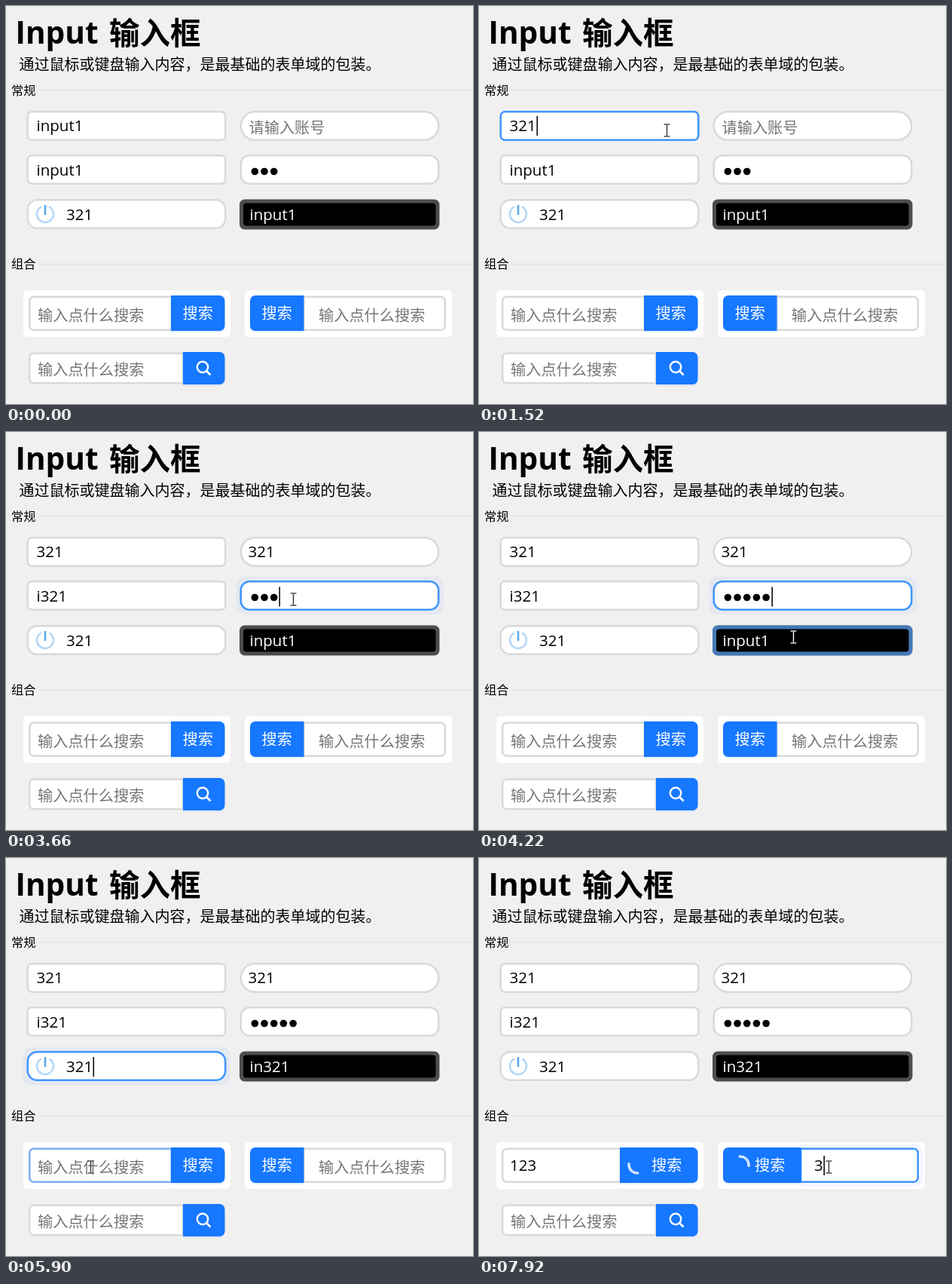
Recreate the animation shown at these times as an HTML page with a canvas. Size 620 by 528 pixels, loop 7990 ms.

```html
<!DOCTYPE html>
<html lang="zh-CN">
<head>
<meta charset="utf-8">
<title>Input 输入框</title>
<style>
html, body { margin: 0; width: 100%; height: 100%; overflow: hidden; background: #f0f0f0; }
canvas { display: block; }
</style>
</head>
<body>
<canvas id="stage" width="620" height="528"></canvas>
<script>
const ctx = document.getElementById('stage').getContext('2d');
const LOOP = 7990, STEP = 76.83;
const FAMILY = '"Open Sans", "Noto Sans CJK SC", "Noto Sans CJK", sans-serif';
const BLUE = '#1677ff', FOCUS = '#4096ff', GREY = '#d9d9d9';
const DOT = 12.7;
const LEFT_LOAD = 7010, RIGHT_LOAD = 7510;

const clamp = v => Math.max(0, Math.min(1, v));
const ease = v => { v = clamp(v); return v * v * (3 - 2 * v); };
const within = (t, span) => !!span && t >= span[0] && t < span[1];
const growth = (t, start) => 32 * ease((t - start) / 220);

// Pointer path: time, x, y
const path = [
  [0, -30, 440], [70, -6, 414], [300, 60, 300], [590, 158, 161], [780, 158, 161],
  [1060, 12, 162], [1300, 14, 164], [1660, 372, 165], [2440, 373, 165],
  [2700, 150, 219], [2760, 150, 219], [2990, 49, 220], [3180, 52, 222],
  [3450, 381, 222], [3960, 381, 222], [4250, 420, 277], [4380, 420, 277],
  [4660, 341, 278], [4800, 341, 279], [4960, 320, 281], [5000, 320, 281],
  [5080, 270, 288], [5320, 196, 277], [5540, 196, 277], [5900, 112, 410],
  [6660, 112, 410], [6930, 262, 411], [7080, 262, 411], [7400, 360, 410],
  [7530, 360, 410], [7700, 464, 410], [7990, 464, 410]
];
const presses = [
  [620, 1090], [1760, 1900], [2710, 3010], [3460, 3580], [4330, 4690],
  [5430, 5540], [6040, 6160], [6990, 7090], [7490, 7590], [7690, 7790]
];

const fields = [
  { x: 27.5, y: 139, w: 265, h: 40, r: 7, tx: 40.5, by: 166, start: 'input1', keep: '', add: '321',
    keys: [1200, 1290, 1380], focus: [610, 1760], drag: [780, 1200], flat: true },
  { x: 310.5, y: 139, w: 265, h: 40, r: 20, tx: 321.5, by: 166, start: '', keep: '', add: '321',
    keys: [2280, 2440, 2520], focus: [1760, 2710], hint: '请输入账号', hx: 322.5, hy: 168.5 },
  { x: 27.5, y: 197, w: 265, h: 40, r: 7, tx: 40.5, by: 225, start: 'input1', keep: 'i', add: '321',
    keys: [3060, 3150, 3240], focus: [2710, 3460], drag: [2760, 3060] },
  { x: 310.5, y: 197, w: 265, h: 40, r: 13, tx: 324, by: 219.5, secret: true, start: '***', keep: '***', add: '**',
    keys: [3830, 3960], focus: [3460, 4330] },
  { x: 27.5, y: 256, w: 265, h: 40, r: 14, tx: 80, by: 284, start: '321', focus: [5430, 6040] },
  { x: 310, y: 256.5, w: 265.5, h: 40, r: 7, tx: 323.5, by: 284, dark: true, start: 'input1', keep: 'in', add: '321',
    keys: [4780, 4880, 5070], focus: [4330, 5430], drag: [4380, 4780] },
  { x: 30, y: 384.5, w: 191, h: 46.5, r: [7, 0, 0, 7], tx: 41, by: 415, start: '', keep: '', add: '123',
    keys: [6270, 6420, 6570], focus: [6040, 6990], hint: '输入点什么搜索', hx: 42, hy: 417.5,
    fit: t => ({ w: 191 - growth(t, LEFT_LOAD) }) },
  { x: 394, y: 384.5, w: 190, h: 46.5, r: [0, 7, 7, 0], tx: 413, by: 415, start: '', keep: '', add: '3',
    keys: [7830], focus: [7690, 8000], hint: '输入点什么搜索', hx: 415, hy: 417.5,
    fit: t => { const g = growth(t, RIGHT_LOAD); return { x: 394 + g, w: 190 - g, tx: 413 + g, hx: 415 + g }; } },
  { x: 30, y: 459.5, w: 206, h: 42, r: [7, 0, 0, 7], tx: 41, by: 489, start: '', hint: '输入点什么搜索', hx: 42, hy: 490 }
];

function pointer(t) {
  let i = 1;
  while (i < path.length - 1 && path[i][0] < t) i++;
  const [t0, x0, y0] = path[i - 1], [t1, x1, y1] = path[i];
  const k = clamp((t - t0) / (t1 - t0));
  return { x: x0 + (x1 - x0) * k, y: y0 + (y1 - y0) * k };
}

const inside = (p, b) => p.x > b.x && p.x < b.x + b.w && p.y > b.y && p.y < b.y + b.h;

// Share of the last 200 ms that the pointer spent over the box
function hover(t, box) {
  let n = 0;
  for (let k = 0; k < 5; k++) n += inside(pointer(Math.max(0, t - 40 * k)), box);
  return n / 5;
}

function setFont(size, weight = 400) { ctx.font = `${weight} ${size}px ${FAMILY}`; }

function label(str, x, y, size = 20.2, color = '#000', weight = 400) {
  setFont(size, weight);
  ctx.fillStyle = color;
  ctx.fillText(str, x, y);
}

function box(x, y, w, h, r, color) {
  ctx.fillStyle = color;
  ctx.beginPath();
  ctx.roundRect(x, y, w, h, r);
  ctx.fill();
}

function line(points, color, width) {
  ctx.strokeStyle = color;
  ctx.lineWidth = width;
  ctx.beginPath();
  points.forEach(([x, y], i) => i ? ctx.lineTo(x, y) : ctx.moveTo(x, y));
  ctx.stroke();
}

function arc(x, y, r, from, to, color, width) {
  ctx.strokeStyle = color;
  ctx.lineWidth = width;
  ctx.beginPath();
  ctx.arc(x, y, r, from, to);
  ctx.stroke();
}

function disc(x, y, r, color) {
  ctx.fillStyle = color;
  ctx.beginPath();
  ctx.arc(x, y, r, 0, Math.PI * 2);
  ctx.fill();
}

function textWidth(f, str) {
  if (f.secret) return str.length * DOT;
  setFont(20.5);
  return ctx.measureText(str).width;
}

function valueText(f, str, color) {
  if (!f.secret) return label(str, f.tx, f.by, 20.5, color);
  for (let i = 0; i < str.length; i++) disc(f.tx + DOT * (i + 0.5), f.by, 4.8, color);
}

function drawSelection(f, t, str) {
  const end = f.tx + textWidth(f, str);
  const from = Math.max(f.tx + textWidth(f, f.keep), Math.min(end, pointer(t).x));
  if (from >= end) return;
  ctx.save();
  ctx.beginPath();
  ctx.rect(from, f.by - 22, end - from, 28);
  ctx.clip();
  ctx.fillStyle = BLUE;
  ctx.fillRect(from, f.by - 22, end - from, 28);
  valueText(f, str, '#fff');
  ctx.restore();
}

function drawField(base, t) {
  const f = base.fit ? { ...base, ...base.fit(t) } : base;
  const focused = within(t, f.focus);
  const keys = f.keys || [];
  const typed = keys.filter(k => k <= t);
  const str = typed.length ? f.keep + f.add.slice(0, typed.length) : f.start;
  const ink = f.dark ? '#fff' : '#000';
  const edge = f.dark ? 5 : 2.5;

  if (focused && !f.flat) {
    box(f.x - 5, f.y - 5, f.w + 10, f.h + 10, 10, `rgba(5,100,255,${f.dark ? 0.07 : 0.05})`);
  }
  box(f.x, f.y, f.w, f.h, f.r, f.dark ? '#4d4d4d' : GREY);
  ctx.globalAlpha = focused ? 1 : hover(t, f);
  box(f.x, f.y, f.w, f.h, f.r, FOCUS);
  ctx.globalAlpha = 1;
  const inner = [].concat(f.r).map(r => Math.max(0, r - edge + (f.dark ? 2 : 0)));
  box(f.x + edge, f.y + edge, f.w - 2 * edge, f.h - 2 * edge, inner, f.dark ? '#000' : '#fff');

  if (!str && f.hint) label(f.hint, f.hx, f.hy, 20.2, '#757575');
  valueText(f, str, ink);
  if (!focused) return;

  if (within(t, f.drag)) return drawSelection(f, t, str);
  const since = t - Math.max(f.focus[0], ...typed);
  if (since % 1060 < 530) {
    const top = f.secret ? f.by - 14 : f.by - 20;
    ctx.fillStyle = ink;
    ctx.fillRect(Math.round(f.tx + textWidth(f, str)) + 0.5, top, 1.5, 26);
  }
}

function button(x, y, w, h, r, t) {
  box(x, y + 2, w, h, r, 'rgba(5,110,255,0.1)');
  box(x, y, w, h, r, BLUE);
  ctx.globalAlpha = hover(t, { x, y, w, h });
  box(x, y, w, h, r, FOCUS);
  ctx.globalAlpha = 1;
}

function searchButton(x, r, loadAt, t, growLeft) {
  const g = growth(t, loadAt);
  const left = growLeft ? x - g : x;
  button(left, 384, 71.5 + g, 47, r, t);
  label('搜索', left + 15.5 + g * 0.83, 415, 20.2, '#fff');
  if (!g) return;
  const turn = ((t - loadAt) * 0.36 + 121) * Math.PI / 180;
  ctx.globalAlpha = g / 32;
  ctx.lineCap = 'round';
  arc(left + 23, 407, 11, turn, turn + 1.75, '#d3e4ff', 3.5);
  ctx.lineCap = 'butt';
  ctx.globalAlpha = 1;
}

function section(str, y) {
  label(str, 7, y + 5.5, 16.3);
  line([[43, y], [620, y]], '#e7e7e7', 2);
}

function drawPower() {
  const a = -Math.PI / 2;
  arc(52, 276, 11, a + 0.5, a + Math.PI * 2 - 0.5, '#b3d7f7', 2.5);
  line([[52, 264], [52, 277]], '#5ba7e8', 2.6);
}

function drawLens() {
  arc(261, 479, 7.2, 0, Math.PI * 2, '#fff', 2.4);
  line([[266, 484], [271.5, 489.5]], '#fff', 2.6);
}

function drawPointer(t) {
  if (t < 60) return;
  const p = pointer(t);
  if (presses.some(s => within(t, s))) disc(p.x, p.y, 15, 'rgba(252,240,95,0.85)');
  const over = fields.find(b => {
    const f = b.fit ? { ...b, ...b.fit(t) } : b;
    return inside(p, { x: f.x + 12, y: f.y, w: f.w - 14, h: f.h });
  });
  ctx.save();
  ctx.translate(Math.round(p.x), Math.round(p.y));
  if (over) {
    const color = over.dark ? '#fff' : '#333';
    line([[0.5, -7.5], [0.5, 7.5]], color, 1.4);
    line([[-3.5, -8], [4.5, -8]], color, 1.3);
    line([[-3.5, 8], [4.5, 8]], color, 1.3);
  } else {
    ctx.lineJoin = 'round';
    ctx.fillStyle = '#fff';
    ctx.strokeStyle = '#000';
    ctx.lineWidth = 1.6;
    ctx.beginPath();
    ctx.moveTo(0, 0);
    ctx.lineTo(0.5, 19.5);
    ctx.lineTo(6, 14.5);
    ctx.lineTo(14, 14);
    ctx.closePath();
    ctx.fill();
    ctx.stroke();
  }
  ctx.restore();
}

function draw(t) {
  ctx.fillStyle = '#f0f0f0';
  ctx.fillRect(0, 0, 620, 528);
  label('Input', 12.5, 50, 40.6, '#000', 700);
  label('输入框', 137, 50.5, 40.5, '#000', 700);
  label('通过鼠标或键盘输入内容，是最基础的表单域的包装。', 17.5, 84.5, 20);
  section('常规', 112);
  section('组合', 342.5);
  box(23, 377, 275, 62, 5, '#fff');
  box(317, 377, 275, 62, 5, '#fff');
  fields.forEach(f => drawField(f, t));
  drawPower();
  searchButton(219, [0, 7, 7, 0], LEFT_LOAD, t, true);
  searchButton(324, [7, 0, 0, 7], RIGHT_LOAD, t, false);
  button(235, 459, 55.5, 43, [0, 7, 7, 0], t);
  drawLens();
  drawPointer(t);
}

// The interface advances in even steps rather than smoothly
function tick() {
  const t = performance.now() % LOOP;
  draw(Math.floor(t / STEP + 0.3) * STEP);
  requestAnimationFrame(tick);
}
tick();
</script>
</body>
</html>
```
